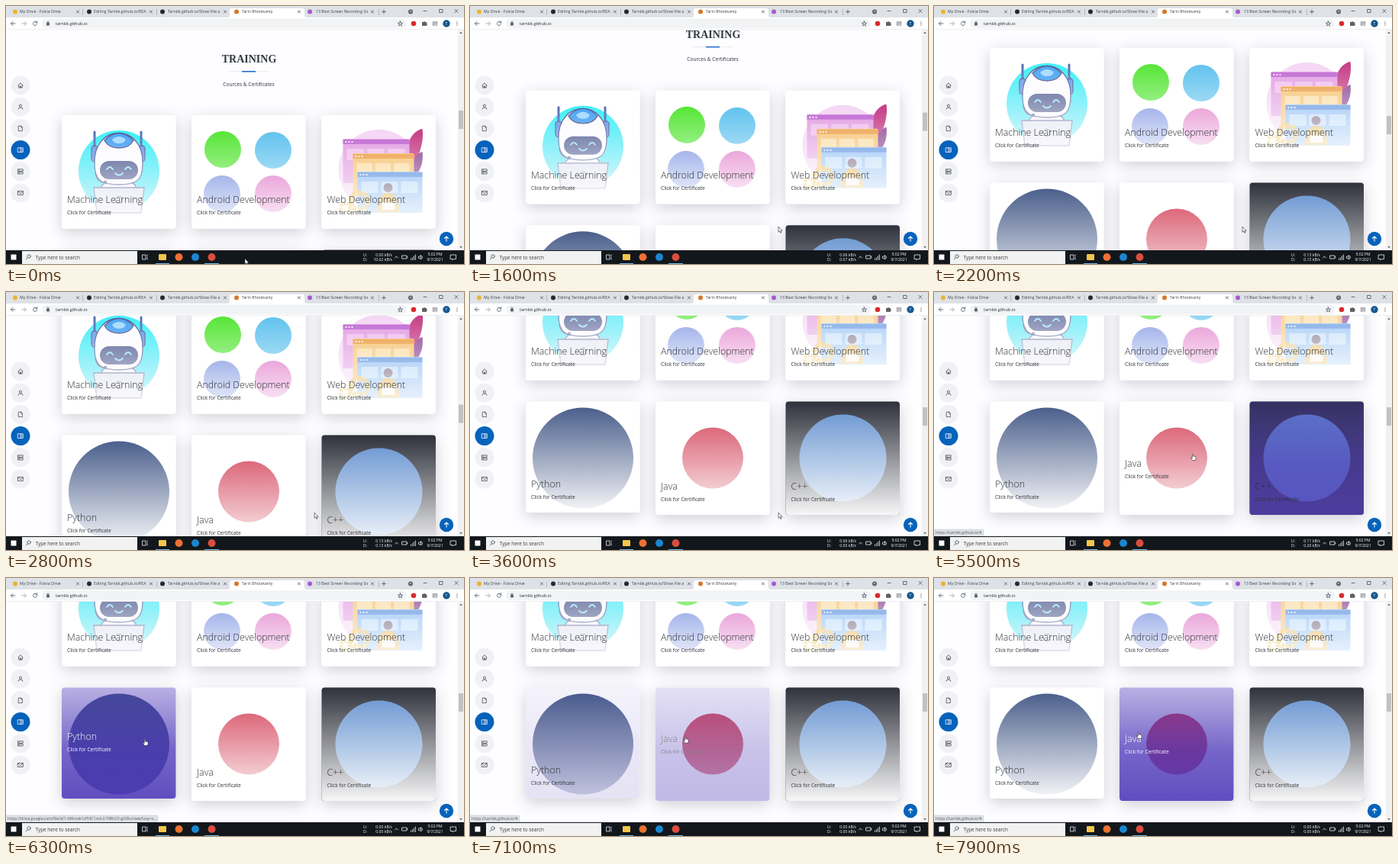
Write an HTML page that moves like this. It is 600x338 px and loops after 8000 ms.

```html
<!DOCTYPE html>
<html lang="en">
<head>
<meta charset="utf-8">
<title>Portfolio browsing</title>
<style>
  html, body { margin: 0; width: 100%; height: 100%; overflow: hidden; background: #fff; }
  svg { display: block; width: 100vw; height: 100vh; font-family: "Open Sans", "Noto Sans", sans-serif; }
  .line { fill: none; stroke: #45505b; stroke-width: .8; stroke-linecap: round; stroke-linejoin: round; }
  .shadow { filter: drop-shadow(0 5px 10px rgba(20, 20, 45, .2)); }
</style>
</head>
<body>
<svg id="stage" viewBox="0 0 600 338" preserveAspectRatio="none"></svg>
<script>
const LOOP = 8000;
const stage = document.getElementById('stage');
const $ = id => document.getElementById(id);

const rect = (x, y, w, h, fill, r = 0, extra = '') =>
  `<rect x="${x}" y="${y}" width="${w}" height="${h}" rx="${r}" fill="${fill}" ${extra}/>`;
const circle = (x, y, r, fill, extra = '') => `<circle cx="${x}" cy="${y}" r="${r}" fill="${fill}" ${extra}/>`;
const text = (x, y, size, str, fill = '#45505b', extra = '') =>
  `<text x="${x}" y="${y}" font-size="${size}" fill="${fill}" ${extra}>${str}</text>`;
const path = (d, extra = '') => `<path d="${d}" ${extra}/>`;
const line = (d, extra = '') => path(d, `class="line" ${extra}`);
const at = (x, y, body, extra = '') => `<g transform="translate(${x} ${y})" ${extra}>${body}</g>`;
const gradient = (id, ...stops) => `<linearGradient id="${id}" x2="0" y2="1">` +
  stops.map(([o, c, a]) => `<stop offset="${o}" stop-color="${c}" stop-opacity="${a}"/>`).join('') + '</linearGradient>';

// Card pictures, relative to the card's top left corner
const outline = 'stroke="#2c3076" stroke-width="1.3"';
const robot = circle(75, 73, 53, 'url(#cyan)') +
  line('M43 22V44M104 22V44', 'style="stroke:#2d4fa5;stroke-width:3"') +
  rect(39, 40, 8, 21, '#3f7fe4', 4, outline) + rect(101, 40, 8, 21, '#3f7fe4', 4, outline) +
  path('M52 94Q55 86 75 86T97 94V106H52Z', `fill="#f0f0fb" ${outline}`) +
  path('M43 64C41 10 108 10 106 64C106 86 97 91 75 91S43 86 43 64Z', `fill="#fbfbff" ${outline}`) +
  path('M56 33Q75 14 94 33Q89 43 75 43T56 33Z', `fill="#1f8df0" ${outline}`) +
  path('M66 32Q75 24 84 32Q82 37 75 37T66 32Z', 'fill="#8fd2ff"') +
  rect(50, 60, 50, 24, '#1d2c70', 12) +
  line('M59 71Q63 65 67 71M83 71Q87 65 91 71M70 76Q75 81 80 76', 'style="stroke:#6fdcff;stroke-width:1.8"') +
  line('M44 76Q47 89 57 88', 'style="stroke:#2c3076;stroke-width:1.4"') + circle(57, 88, 2.2, '#2c3076') +
  path('M42 95H108L104 128H46Z', `fill="#d2d2ec" ${outline}`) + circle(75, 111, 4.5, '#fff', outline);

const appDots = [[41, 45, '#2fe008'], [107, 46, '#3cb4ea'], [40, 103, '#3c5fd2'], [107, 103, '#d33fb0']]
  .map(([x, y, c]) => circle(x, y, 24, c)).join('');

const pane = (x, y, w, h, head, body, block) => rect(x, y, w, h, body, 1.5) +
  path(`M${x} ${y + 7}V${y + 1}H${x + w}V${y + 7}Z`, `fill="${head}"`) +
  [4, 8, 12].map(d => circle(x + d, y + 4, 1.1, '#fff')).join('') +
  [0, 1, 2].map(i => rect(x + 5 + i * (w - 7) / 3, y + 13, (w - 19) / 3, 15, block, 1)).join('');
const windows = circle(75, 72, 53, '#f2cdf2') +
  path('M110 72C106 42 118 20 132 18C135 38 125 58 117 73Z', 'fill="#b8136c"') +
  path('M117 77C118 57 127 49 132 48C134 66 127 75 119 84Z', 'fill="#6d1678"') +
  pane(28, 31, 87, 58, '#b045c8', '#dc88dc', '#ecb0ea') +
  pane(41, 50, 80, 53, '#e67f0c', '#f4b048', '#f9d48c') +
  pane(47, 74, 85, 54, '#1f68d2', '#66a6f0', '#a8d0f8') +
  path('M72 127C74 108 79 102 87 102S100 108 102 127Z', 'fill="#e09400"') +
  circle(87, 95, 6, '#40254a') + rect(79, 114, 17, 10, '#f5efe9', 1) +
  circle(49, 113, 11, 'none', 'stroke="#eca400" stroke-width="7" stroke-dasharray="5 2"') +
  circle(31, 121, 6, 'none', 'stroke="#eca400" stroke-width="5" stroke-dasharray="3 2"');

const cards = [
  { name: 'Machine Learning', x: 73, y: 143, art: robot, hovers: [] },
  { name: 'Android Development', x: 243, y: 143, art: appDots, hovers: [[4080, 4640]] },
  { name: 'Web Development', x: 413.5, y: 143, art: windows, hovers: [[4720, 4960]] },
  { name: 'Python', x: 73, y: 319.5, h: 145.5, art: circle(75, 74, 66, '#344b7d'), hovers: [[5960, 6800]],
    link: 'https://drive.google.com/file/d/1-AWsrde1cPI4C1mA.II-T8RrGY-gIXFlu/view?usp=s...' },
  { name: 'Java', x: 243, y: 319.5, art: circle(75, 74, 40, '#cf3049'),
    hovers: [[5380, 5880], [6880, LOOP]], link: 'https://tarnbk.github.io/#' },
  { name: 'C++', x: 413.5, y: 319.5, bg: '#20232e', art: circle(75, 74, 57, '#5688cb'),
    hovers: [[5030, 5320]], link: 'https://tarnbk.github.io/#' },
];

// Layers overlap the clip by a pixel so that no dark edge shows through
const drawCard = ({ name, x, y, h = 148.5, bg = '#fff', art }, i) => {
  const layer = (fill, extra) => rect(-1, -1, 151.5, h + 2, fill, 0, extra);
  return at(x, y, rect(0, 0, 149.5, h, '#fff', 4, 'class="shadow"') +
    `<clipPath id="clip${i}">${rect(0, 0, 149.5, h, '#fff', 4)}</clipPath><g clip-path="url(#clip${i})">` +
    layer(bg) + art + layer('url(#fade)', `id="fade${i}"`) + layer('url(#tint)', `id="tint${i}"`) +
    `<g id="label${i}">` + text(7, h - 33.5, 12.4, name, 'inherit', 'font-weight="300"') +
    text(7, h - 18.5, 6.6, 'Click for Certificate', 'inherit') + '</g></g>');
};

const page = `<g id="page">` +
  text(318.5, 74, 14, 'TRAINING', '#333940',
    'text-anchor="middle" font-weight="700" font-family="Liberation Serif, serif"') +
  rect(292, 85.6, 53, .6, '#ddd') + rect(309, 85, 18, 1.6, '#2a6fc8') +
  text(318, 104.5, 6.6, 'Cources &amp; Certificates', '#30363c', 'text-anchor="middle"') +
  cards.map(drawCard).join('') + '</g>';

const navIcons = [
  'M-3 0L0 -3.2L3 0M-2.3 -.5V3H2.3V-.5M-.6 3V1H.6V3',
  'M-1.6 -1.5A1.6 1.6 0 1 1 1.6 -1.5A1.6 1.6 0 1 1 -1.6 -1.5M-3 3Q-3 .8 0 .8T3 3',
  'M-2.4 -3.2H.8L2.4 -1.4V3.2H-2.4ZM.8 -3.2V-1.4H2.4',
  'M-3.3 -2.8H3.3V2.8H-3.3ZM0 -2.8V2.8M1.1 -1H2.2M1.1 1H2.2',
  'M-3.2 -3H3.2V-.5H-3.2ZM-3.2 .8H3.2V3.2H-3.2ZM-2 -1.8H-1.3M-2 2H-1.3',
  'M-3.3 -2.5H3.3V2.5H-3.3ZM-3.3 -2L0 .7L3.3 -2',
];
const sideNav = navIcons.map((d, i) => at(19, 104 + 28.2 * i,
  circle(0, 0, 12.5, i === 3 ? '#0563bb' : '#f1f1f3') + line(d, i === 3 ? 'style="stroke:#fff"' : ''))).join('') +
  at(577, 305, circle(0, 0, 9.2, '#0563bb') + line('M0 3V-3M-2.6 -.6L0 -3L2.6 -.6', 'style="stroke:#fff;stroke-width:1.1"'));

const scrollbar = rect(592, 31, 8, 289, '#f1f1f1') + rect(593, 137, 6, 24, '#c1c1c1', 0, 'id="thumb"') +
  path('M594.2 36L596 34L597.8 36ZM594.2 315L596 317L597.8 315Z', 'fill="#555"');

const tabs = [
  [12, 18, 94, '#e9b52d', 'My Drive - Folvia Drive'],
  [109, 115, 190, '#24292e', 'Editing Tarnbk.github.io/REA'],
  [205, 212, 287, '#24292e', 'Tarnbk.github.io/Show File a'],
  [302, 309, 384, '#d8762b', 'Tarin Bholakanty'],
  [398, 406, 480, '#a55bd0', '13 Best Screen Recording So'],
];
const cross = (x, y, r) => line(`M${x - r} ${y - r}L${x + r} ${y + r}M${x + r} ${y - r}L${x - r} ${y + r}`);
const browser = rect(0, 0, 600, 15, '#dee1e6') +
  path('M290 15Q293 15 293 12V6Q293 3 296 3H388Q391 3 391 6V12Q391 15 394 15Z', 'fill="#fff"') +
  tabs.map(([icon, x, close, color, title]) => circle(icon, 7.5, 3, color) +
    text(x, 9.4, 5.2, title, '#3c4043') + cross(close, 7.5, 1.5)).join('') +
  [100, 197, 488].map(x => rect(x, 4, .5, 8, '#8f9399')).join('') +
  line('M492.6 7.5H497.4M495 5.1V9.9M547 6.5H551M568 4.5H572V8.5H568Z') + cross(590, 6.5, 2) +
  circle(530, 7.5, 3, '#5f6368') + path('M528.7 6.8H531.3L530 8.3Z', 'fill="#fff"') +
  rect(0, 15, 600, 16, '#fff') + rect(47, 16.5, 478, 12.5, '#f1f3f4', 6.2) + rect(0, 30.5, 600, .5, '#dadce0') +
  line('M12 23H6.5M9 20.5L6.5 23L9 25.5') +
  line('M21 23H26.5M24 20.5L26.5 23L24 25.5', 'style="stroke:#9aa0a6"') +
  line('M40 21.2A2.6 2.6 0 1 0 40.6 23.4M40.8 19.8V21.8H38.7') +
  rect(53, 22, 4, 3.4, '#5f6368', .4) + line('M53.9 22V21Q55 19.2 56.1 21V22') +
  text(65, 25, 5.6, 'tarnbk.github.io', '#25282c') +
  path('M516.5 20L517.3 22.2L519.6 22.3L517.8 23.7L518.4 25.9L516.5 24.6L514.6 25.9L515.2 23.7L513.4 22.3L515.7 22.2Z', 'class="line"') +
  circle(534, 23, 3.3, '#d92c2c') +
  path('M545 21H547Q548 19 549 21H551V23Q553 24 551 25V26H545Z', 'fill="#5f6368"') +
  line('M559 21H565M559 23H565M559 25H562M564 24.5V26') +
  circle(577, 23, 4.7, '#12578f') + text(577, 24.8, 5, 'T', '#fff', 'text-anchor="middle"') +
  [20.8, 23, 25.2].map(y => circle(591, y, .65, '#5f6368')).join('');

const white = 'style="stroke:#f2f2f2"';
const trayText = (x, y, str, anchor, id = '') => text(x, y, 5.1, str, '#fff', `text-anchor="${anchor}" ${id}`);
const taskbar = rect(0, 320, 600, 18, '#12171c') + rect(6.5, 325.5, 7, 7, '#fff') +
  rect(21, 321, 151, 17, '#f2f2f2') + circle(30, 328, 2.2, 'none', 'class="line"') + line('M28.4 329.7L26.4 332') +
  text(38.5, 331.6, 6.4, 'Type here to search', '#3c3c3c') +
  line('M179 326H183V332H179ZM185 326V327.5M185 329V332', white) +
  rect(200, 325, 10, 8, '#f3c64c', 1) + circle(226.5, 329, 5, '#ed7130') +
  circle(248, 329, 5, '#1b87cf') + circle(269.5, 329, 5, '#dc4d3d') +
  rect(196, 337, 18, 1, '#76b9ed') + rect(260, 337, 19, 1, '#76b9ed') +
  trayText(468, 328, 'U:', 'start') + trayText(468, 334, 'D:', 'start') +
  trayText(506, 328, '', 'end', 'id="up"') + trayText(506, 334, '', 'end', 'id="down"') +
  line('M509.5 330L511.5 328L513.5 330M519 327H525V331H519ZM525.8 328.3V329.7', white) +
  line('M530.5 332.5V331M532.5 332.5V329.5M534.5 332.5V327.5M536.5 332.5V326', white) +
  line('M541 328H542L543.5 326.5V332L542 330.5H541ZM545 327.5Q546.3 329.2 545 331', white) +
  trayText(562, 327, '5:02 PM', 'middle') + trayText(562, 334, '9/7/2021', 'middle') +
  line('M582.5 326H589.5V331.5H586.5L585 333V331.5H582.5Z', white);

const status = `<g id="status">` + rect(-2, 311, 10, 10, '#dee1e6', 2, 'id="statusBox" stroke="#c3c6ca" stroke-width=".5"') +
  text(2, 317.3, 5.1, '', '#55595e', 'id="statusText"') + '</g>';
const pointer = `<g id="pointer" stroke="#222" stroke-width=".6" fill="#fff">` +
  path('M0 0V7.2L1.7 5.7L2.8 8.3L4 7.8L2.9 5.3H5.1Z', 'id="arrow"') +
  path('M-.7 .5Q0 -.5 .7 .5V3L3.7 3.8Q4.3 4 4.2 5L3.6 8.5H-.6L-2.7 5.2Q-2.4 4.2 -.7 5.4Z', 'id="hand"') + '</g>';

stage.innerHTML = '<defs>' +
  gradient('cyan', [0, '#12eef6', 1], [1, '#20d8f2', 1]) +
  gradient('fade', [0, '#fff', .06], [1, '#fff', .97]) +
  gradient('tint', [0, '#5946be', .42], [.55, '#4f3ab8', .78], [1, '#4f3ab8', .9]) +
  '</defs>' + rect(0, 0, 600, 338, '#fefdff') + page + sideNav + scrollbar + status + browser + taskbar + pointer;

// Motion
const clamp = v => Math.max(0, Math.min(1, v));
const smooth = v => v * v * (3 - 2 * v);
const notches = [1500, 1900, 2300, 3000];
const scrollAt = t => notches.reduce((sum, start) => sum + 44 * (1 - (1 - clamp((t - start) / 210)) ** 2), 0);

const track = [[0, 313, 331], [300, 313, 331], [1000, 404, 289], [3700, 404, 289], [4080, 385, 140], [4400, 361, 78],
  [4600, 375, 82], [4850, 455, 92], [5150, 460, 195], [5350, 400, 214], [5500, 339, 212], [5900, 232, 214],
  [6300, 182, 211], [6700, 186, 209], [7000, 275, 208], [7400, 320, 206], [7900, 268, 202], [LOOP, 268, 202]];
function pointerAt(t) {
  const i = track.findIndex((p, k) => k && t <= p[0]);
  const [a, b] = [track[i - 1], track[i]];
  const k = smooth((t - a[0]) / (b[0] - a[0]));
  return [a[1] + (b[1] - a[1]) * k, a[2] + (b[2] - a[2]) * k];
}

const ramp = (t, hovers) => hovers.reduce((v, [from, to]) =>
  Math.max(v, Math.min(clamp((t - from) / 180), 1 - clamp((t - to) / 180))), 0);
const mix = (a, b, k) => `rgb(${a.map((v, i) => Math.round(v + (b[i] - v) * k))})`;

const speeds = [[0, '0.00', '10.02'], [1000, '0.06', '0.07'], [2000, '0.13', '0.13'], [3100, '0.06', '0.00'],
  [5000, '0.11', '0.20'], [6000, '0.00', '0.00']];

function draw(t) {
  const scroll = scrollAt(t);
  $('page').setAttribute('transform', `translate(0 ${-scroll})`);
  $('thumb').setAttribute('y', 137 + scroll * .08);

  let hovered = null;
  cards.forEach((card, i) => {
    const lift = ramp(t, card.hovers);
    const tint = ramp(t - 150, card.hovers);
    $('fade' + i).setAttribute('opacity', 1 - tint);
    $('tint' + i).setAttribute('opacity', tint);
    $('label' + i).setAttribute('transform', `translate(0 ${-43.5 * lift})`);
    $('label' + i).setAttribute('fill', mix([45, 50, 56], [255, 255, 255], lift * tint));
    if (card.hovers.some(([from, to]) => t >= from && t < to)) hovered = card;
  });

  const link = hovered && hovered.link;
  $('status').setAttribute('visibility', link ? 'visible' : 'hidden');
  if (link) {
    $('statusText').textContent = link;
    $('statusBox').setAttribute('width', link.length > 40 ? 201 : 67);
  }

  const [x, y] = pointerAt(t);
  $('pointer').setAttribute('transform', `translate(${x} ${y})`);
  $('arrow').setAttribute('visibility', hovered ? 'hidden' : 'visible');
  $('hand').setAttribute('visibility', hovered ? 'visible' : 'hidden');

  const [, up, down] = speeds.filter(s => s[0] <= t).pop();
  $('up').textContent = up + ' kB/s';
  $('down').textContent = down + ' kB/s';
}

const start = performance.now();
function frame() {
  draw((performance.now() - start) % LOOP);
  requestAnimationFrame(frame);
}
draw(0);
requestAnimationFrame(frame);
</script>
</body>
</html>
```
